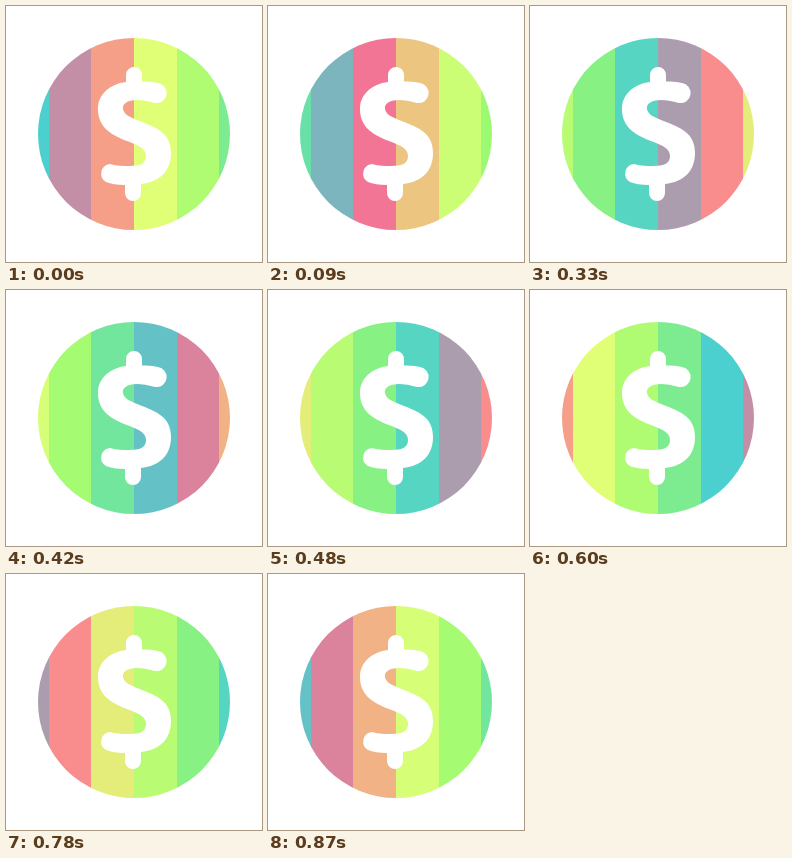
These frames come from a looping animation (256x256 px, 900 ms). An HTML page:

```html
<!DOCTYPE html>
<html lang="en">
<head>
<meta charset="utf-8">
<title>Rainbow coin</title>
<style>
html, body { margin: 0; width: 100%; height: 100%; overflow: hidden; background: #fff; }
svg { display: block; width: 100vw; height: 100vh; }
</style>
</head>
<body>
<svg viewBox="0 0 256 256">
  <clipPath id="coin"><circle cx="128" cy="128" r="96"/></clipPath>
  <g id="stripes" clip-path="url(#coin)" shape-rendering="crispEdges"></g>
  <path fill="#fff" d="M120 69a8 8 0 0 1 16 0V75.500Q146 75 152 77A10 10 0 0 1 149 97C142 95 136 94 131 94C121 94 116 98 117 103C118 109 124 111 136 116C155 123 165 130 165 147C165 165 154 176 135 178V187a8 8 0 0 1-16 0V179C111 179 105 178 100 176A9.700 9.700 0 0 1 104 158C111 160 117 160 123 160C135 160 140 157 140 150C140 143 134 140 121 135C102 128 92 119 92 103C92 88 104 78 120 76Z"/>
</svg>
<script>
const LOOP = 900, STEP = 30, COUNT = 6, WIDTH = 256 / COUNT;
const palette = [[76, 207, 207], [255, 111, 145], [224, 255, 119], [150, 250, 113]];
const group = document.getElementById('stripes');

const stripes = Array.from({ length: COUNT }, (_, i) => {
  const rect = document.createElementNS('http://www.w3.org/2000/svg', 'rect');
  rect.setAttribute('x', i * WIDTH);
  rect.setAttribute('width', WIDTH);
  rect.setAttribute('height', 256);
  return group.appendChild(rect);
});

// Colour at a position (0 to 1) around the cyclic palette
function colorAt(position) {
  const p = (position - Math.floor(position)) * palette.length;
  const k = Math.floor(p);
  const next = palette[(k + 1) % palette.length];
  const rgb = palette[k].map((v, c) => Math.round(v + (next[c] - v) * (p - k)));
  return `rgb(${rgb})`;
}

function draw(now) {
  const time = Math.floor((now % LOOP) / STEP) * STEP;
  stripes.forEach((rect, i) => rect.setAttribute('fill', colorAt(i / COUNT - time / LOOP)));
}

function tick() {
  draw(performance.now());
  requestAnimationFrame(tick);
}
tick();
</script>
</body>
</html>
```
